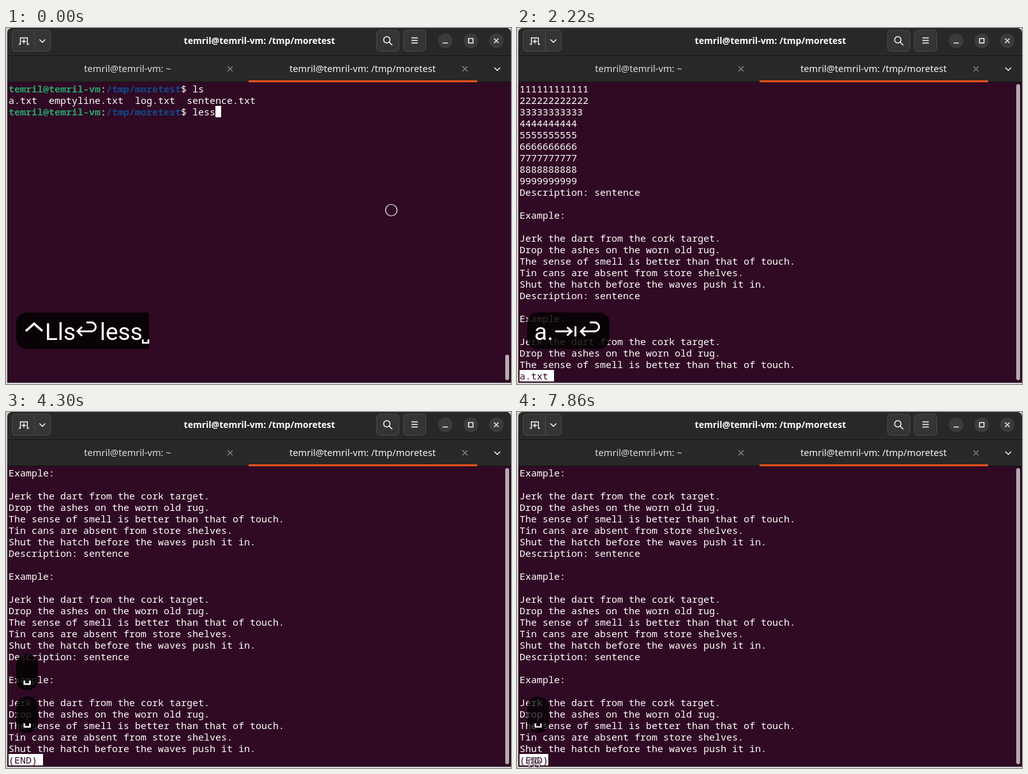
Animation, 791 px wide and 558 px high, one loop 8 s. Source, as an HTML page:

```html
<!DOCTYPE html>
<html lang="en">
<head>
<meta charset="utf-8">
<title>Paging a text file</title>
<style>
  html, body { margin: 0; width: 100%; height: 100%; overflow: hidden; background: #d2d2d2; }
  svg { display: block; width: 791px; height: 558px; }
  text { white-space: pre; }
  .mono { font: 15px "Noto Sans Mono", "DejaVu Sans Mono", monospace; fill: #fff; }
  .b { font-weight: 700; }
  .user { fill: #26a269; }
  .path { fill: #12488b; }
  .ui { font: 14.6px "Noto Sans", "Open Sans", sans-serif; fill: #f4f4f4; text-anchor: middle; }
  .title { font-size: 14px; font-weight: 700; fill: #fff; }
  .key { font: 37px Roboto, "Liberation Sans", sans-serif; fill: #fff; }
  .line { fill: none; stroke: #fff; }
  .btn { fill: #353535; stroke: #4a4a4a; }
</style>
</head>
<body>
<svg viewBox="0 0 791 558">
  <rect width="791" height="558" fill="#d2d2d2"/>
  <path d="M2 556V8a8 8 0 0 1 8-8H783a8 8 0 0 1 8 8V556Z" fill="#300a24"/>
  <path d="M2 85V8a8 8 0 0 1 8-8H783a8 8 0 0 1 8 8V85Z" fill="#282828"/>
  <path d="M2 43.5H791M2 84.5H791" stroke="#151515"/>
  <path d="M2 555.5H791" stroke="#25101f"/>
  <path d="M380 83.5H738" stroke="#e95420" stroke-width="3"/>

  <rect class="btn" x="9.5" y="3.5" width="60" height="33" rx="5"/>
  <path d="M44.5 4V36" stroke="#4a4a4a"/>
  <rect class="btn" x="580.5" y="3.5" width="35" height="33" rx="5"/>
  <rect class="btn" x="622.5" y="3.5" width="35" height="33" rx="5"/>
  <g fill="#3b3b3b">
    <circle cx="688" cy="20" r="11.5"/><circle cx="728" cy="20" r="11.5"/><circle cx="768" cy="20" r="11.5"/>
  </g>
  <g class="line" stroke-width="1.4">
    <path d="M20 25.5H22.5V15.5H33.5V25.5H36M28 17.5V24.5M24.5 21H31.5"/>
    <path d="M52.5 18L57 22.5L61.5 18M765 62L769.5 66.5L774 62"/>
    <circle cx="596.5" cy="18.5" r="5"/><path d="M600 22L605 27"/>
    <path d="M635 15.5H645M635 19.5H645M635 23.5H645"/>
    <path d="M684 23.5H692"/><rect x="724.5" y="16.5" width="7" height="7"/>
    <path d="M764.5 16.5L771.5 23.5M771.5 16.5L764.5 23.5"/>
  </g>
  <path class="line" style="stroke:#858585" stroke-width="1.4" d="M347 60L355 68M355 60L347 68M715 60L723 68M723 60L715 68"/>
  <text class="ui title" x="397" y="25">temril@temril-vm: /tmp/moretest</text>
  <text class="ui" x="190.5" y="69" style="fill:#dcdcdc">temril@temril-vm: ~</text>
  <text class="ui" x="558.5" y="69">temril@temril-vm: /tmp/moretest</text>

  <g id="term"></g>
  <g id="keys"></g>
  <g id="mouse"></g>
</svg>
<script>
const LOOP = 8000, TOP = 86, ROW = 18, COL = 9, LEFT = 4, PAGE = 25;
const el = id => document.getElementById(id);

// Latest [time, ...values] entry whose time has passed.
const at = (steps, t) => steps.filter(s => s[0] <= t).pop();

const block = ["Description: sentence", "", "Example:", "",
  "Jerk the dart from the cork target.",
  "Drop the ashes on the worn old rug.",
  "The sense of smell is better than that of touch.",
  "Tin cans are absent from store shelves.",
  "Shut the hatch before the waves push it in."];
const file = [12, 12, 11, 10, 10, 10, 10, 10, 10].map((n, i) => String(i + 1).repeat(n));
for (let i = 0; i < 5; i++) file.push(...block);

const shell = [[0, "less"], [140, "less "], [1340, "less a"], [1480, "less a."], [1630, "less a.txt "]];
const pager = [[1930, 0, "a.txt"], [2820, 25, ":"], [4300, 29, "(END)"]];
const blink = [[0, 1], [740, 0], [1190, 1], [2520, 0], [2820, 1], [3410, 0], [4010, 1],
  [4890, 0], [5190, 1], [5780, 0], [5930, 1], [6520, 0], [7110, 1], [7710, 0]];
const mouse = [[0, 603.5, 285.5], [140], [6670, 155, 460], [6820, 125, 478], [6970, 95, 492],
  [7110, 65, 504], [7260, 37, 517], [7410, 31, 551], [7710, 27, 551]];

// Key glyphs, relative to the top left of a bubble.
const word = (x, s) => `<text class="key" x="${x}" y="43">${s}</text>`;
const stroke = (x, w, d) => `<path class="line" stroke-width="${w}" transform="translate(${x} 0)" d="${d}"/>`;
const ctrl = x => stroke(x, 3.6, "M0 29L13 17.5L26 29");
const enter = x => stroke(x, 3, "M16 15.5H23.5a7 7 0 0 1 0 14H2M9 22.5L2 29.5L9 36.5");
const tab = x => stroke(x, 3, "M0 29.5H25M18.5 23L25.5 29.5L18.5 36M31.5 21.5V37.5");
const space = x => stroke(x, 2.6, "M1.3 42V47.5H10V42");

const A = word(11, "a"), DOT = word(11, "a.");
const bubble = (fade, end, ...looks) => ({ fade, end, looks });
const spaceKey = (born, fade, end) => bubble(fade, end, [born, 34, space(11.5)]);
const line1 = ctrl(15) + word(45, "Lls") + enter(94) + word(131, "less") + space(197);
const bubbles = [
  bubble(2080, 2220, [0, 208, line1], [140, 220, line1]),
  bubble(3860, 4010, [1190, 42, A], [1340, 52, DOT], [1480, 90, DOT + tab(44)],
    [1930, 129, DOT + tab(44) + enter(82)]),
  spaceKey(2820, 4750, 4890),
  spaceKey(4300, 6230, 6380),
  spaceKey(5190, 7110, 7260),
  spaceKey(5930, 7860, 8100)
];

const rect = (x, y, w, h, fill = "#fff") => `<rect x="${x}" y="${y}" width="${w}" height="${h}" fill="${fill}"/>`;
const cell = (col, row, n) => rect(LEFT + col * COL, TOP + row * ROW, n * COL, ROW);
const row = (i, s, style = "") =>
  `<text class="mono" x="${LEFT}" y="${TOP + i * ROW + 15}" style="${style}">${s}</text>`;
const bar = y => `<rect x="782" y="${y}" width="6" height="${552 - y}" rx="3" fill="#b3acb0"/>`;
const prompt = cmd => '<tspan class="b user">temril@temril-vm</tspan>:' +
  `<tspan class="b path">/tmp/moretest</tspan>$ ${cmd}`;

function drawTerm(t) {
  const on = at(blink, t)[1], page = at(pager, t);
  if (!page) {
    const cmd = at(shell, t)[1];
    return row(0, prompt("ls")) + row(1, "a.txt  emptyline.txt  log.txt  sentence.txt") +
      row(2, prompt(cmd)) + (on ? cell(32 + cmd.length, 2, 1) : "") + bar(512);
  }
  const [, first, status] = page, plain = status === ":";
  return file.slice(first, first + PAGE).map((s, i) => row(i, s)).join("") +
    (plain ? "" : cell(0, PAGE, status.length)) +
    row(PAGE, status, plain ? "" : "fill:#300a24") +
    (on ? cell(status.length, PAGE, 1) : "") + bar(88);
}

function drawKeys(t) {
  const live = bubbles.filter(b => b.looks[0][0] <= t && t < b.end).reverse();
  return live.map((b, i) => {
    const [born, w, glyphs] = at(b.looks, t);
    const cut = born === 0;
    const box = cut ? `<path d="M${w} 0H16a16 16 0 0 0-16 16V41a16 16 0 0 0 16 16H${w}Z" fill-opacity=".82"/>`
      : `<rect width="${w}" height="57" rx="16" fill-opacity=".82"/>`;
    return `<g transform="translate(16 ${446 - i * 67})" opacity="${t < b.fade ? 1 : 0.85}">${box}${glyphs}</g>`;
  }).join("");
}

function drawMouse(t) {
  const [, x, y] = at(mouse, t);
  if (x === undefined) return "";
  const ring = `<circle class="line" cx="${x}" cy="${y}" r="9" stroke-width="1.2"/>`;
  if (y < 540) return ring;
  // Over the status line the ring gets a dark edge and a cross.
  const cross = `M${x - 5} ${y}h10M${x} ${y - 5}v10`;
  return `<circle cx="${x}" cy="${y}" r="9" fill="none" stroke="#300a24" stroke-width="2.4"/>${ring}` +
    `<path d="${cross}" stroke="#300a24" stroke-width="3"/><path class="line" d="${cross}" stroke-width="1.2"/>`;
}

const layers = [["term", drawTerm], ["keys", drawKeys], ["mouse", drawMouse]];
const shown = {};
const start = performance.now();
function tick() {
  const t = (performance.now() - start) % LOOP;
  for (const [id, draw] of layers) {
    const svg = draw(t);
    if (shown[id] !== svg) el(id).innerHTML = shown[id] = svg;
  }
  requestAnimationFrame(tick);
}
tick();
</script>
</body>
</html>
```
